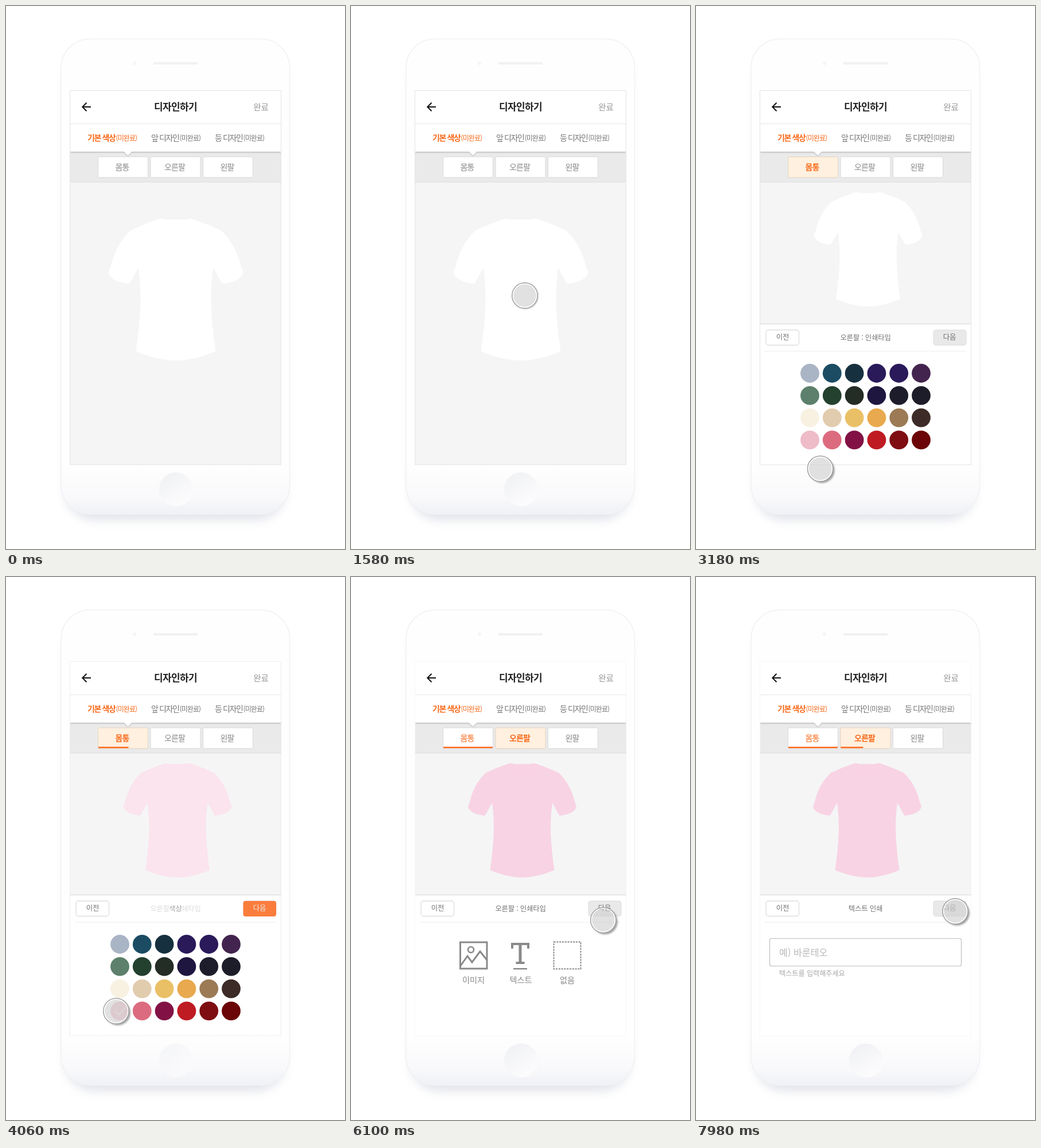
Recreate the animation shown at these times as an HTML page. Size 591x947 px, loop 8000 ms.

```html
<!DOCTYPE html>
<html lang="ko">
<head>
<meta charset="utf-8">
<style>
html, body { margin: 0; width: 100%; height: 100%; overflow: hidden; background: #fff; }
svg { display: block; width: 100%; height: 100%; font-family: "Noto Sans CJK KR", "Noto Sans CJK", "Noto Sans KR", sans-serif; }
text { text-anchor: middle; fill: #888; }
.start { text-anchor: start; }
.title { font-size: 17px; font-weight: 700; letter-spacing: -.6px; fill: #222; }
.main { font-size: 14px; letter-spacing: -1.4px; font-weight: 500; fill: #777; }
.note { font-size: 12px; letter-spacing: -.9px; fill: #777; }
.main.on { font-weight: 700; }
.on { fill: #f96a1b; }
.part { font-size: 14px; letter-spacing: -.8px; }
.bold { font-weight: 700; }
.bar { font-size: 12.4px; letter-spacing: -.2px; font-weight: 500; fill: #707070; }
.choice { font-size: 14.2px; font-weight: 500; }
.shirt path { fill: inherit; stroke: #e1e1e1; stroke-width: 1.1; stroke-linejoin: round; }
.shirt .line { fill: none; }
.icon { fill: none; stroke: #8a8a8a; }
</style>
</head>
<body>
<svg viewBox="0 0 591 947" preserveAspectRatio="none">
  <defs>
    <linearGradient id="body" x1="0" y1="0" x2="0" y2="1">
      <stop offset="0" stop-color="#fefefe"/><stop offset=".9" stop-color="#fefefe"/>
      <stop offset=".965" stop-color="#f9f9fb"/><stop offset="1" stop-color="#f0f1f5"/>
    </linearGradient>
    <linearGradient id="homeFill" x1="0" y1="0" x2=".6" y2="1">
      <stop offset="0" stop-color="#eff0f3"/><stop offset="1" stop-color="#fcfcfd"/>
    </linearGradient>
    <filter id="soft" x="-20%" y="-20%" width="140%" height="140%"><feGaussianBlur stdDeviation="9"/></filter>
    <filter id="blur" x="-30%" y="-30%" width="160%" height="160%"><feGaussianBlur stdDeviation="1.8"/></filter>
    <filter id="drop" x="-5%" y="-20%" width="110%" height="150%">
      <feDropShadow dx="0" dy="1.5" stdDeviation="1.2" flood-color="#000" flood-opacity=".2"/>
    </filter>
    <clipPath id="screen"><rect x="112" y="148" width="367.5" height="652"/></clipPath>
    <mask id="outside" maskUnits="userSpaceOnUse" x="-40" y="-40" width="80" height="80">
      <rect x="-40" y="-40" width="80" height="80" fill="#fff"/><circle r="22" fill="#000"/>
    </mask>
    <g id="half">
      <path d="M217 392C198 410 188 432 182 457L179 464Q181 480 215 484L219 477L231 455C225 430 226 410 217 392Z"/>
      <path class="line" d="M182 457Q192 472 219 477"/>
      <path d="M296 373Q280 374 271 371L264 373Q240 381 217 392C226 410 225 430 231 455C238 500 235 545 227 602Q262 617 296 618"/>
      <path class="line" d="M264 373C263 386 277 397 296 397M267 372C269 384 281 391 296 391M271 371C275 382 284 388 296 388"/>
    </g>
  </defs>

  <rect x="104" y="80" width="382" height="816" rx="50" fill="#687090" opacity=".2" filter="url(#soft)"/>
  <rect x="96" y="57.5" width="398.5" height="829" rx="50" fill="url(#body)" stroke="#f0f1f4" stroke-width="1.5"/>
  <circle cx="224" cy="100" r="3" fill="#f5f5f7"/>
  <path d="M259 100H332" stroke="#f1f1f4" stroke-width="4.5" stroke-linecap="round"/>
  <circle id="home" cx="296.5" cy="843" r="29.5" fill="url(#homeFill)"/>

  <g clip-path="url(#screen)">
    <rect x="112" y="148" width="368" height="652" fill="#f5f5f5"/>
    <g id="shirt" class="shirt">
      <path d="M296 380V617" style="stroke:inherit;stroke-width:6"/>
      <use href="#half"/><use href="#half" transform="translate(592) scale(-1 1)"/>
    </g>
    <rect x="112" y="250" width="368" height="57" fill="#eaeaea"/>
    <path d="M112 307H480" stroke="#dcdcdc"/>
    <path d="M112 205H479.5V254H219L212.500 260.500L206 254H112Z" fill="#fff" filter="url(#drop)"/>
    <rect x="112" y="148" width="368" height="57" fill="#fff"/>
    <path d="M112 205.500H480" stroke="#e6e6e6"/>
    <g id="parts"></g>

    <g id="panel">
      <rect x="112" y="555" width="368" height="245" fill="#fff"/>
      <path d="M112 554.500H480" stroke="#d6d6d6"/>
      <path d="M120 602H470" stroke="#ebebeb"/>
      <rect x="122" y="565" width="57.5" height="26.500" rx="4" fill="#fff" stroke="#dedede" stroke-width="1.3"/>
      <text class="bar bold" x="151" y="582">이전</text>
      <rect x="414" y="565" width="57" height="26.500" rx="4" fill="#e9e9e9" stroke="#dcdcdc"/>
      <text class="bar" x="442" y="582">다음</text>
      <g id="next"><rect x="413.500" y="565" width="57.500" height="27" rx="4" fill="#ff6a1f"/>
        <text class="bar" x="442" y="582" style="fill:#fff">다음</text></g>
      <g id="labels"></g>
      <g id="swatches"></g>
      <path id="check" d="M190.500 757L197 763.500L208 751" fill="none" stroke="#fff" stroke-width="2.2"/>
      <g id="choices">
        <g class="icon" stroke-width="3">
          <rect x="190.500" y="637" width="46.500" height="46"/>
          <circle cx="209" cy="650" r="5" stroke-width="2.600"/>
          <path d="M191 678L203 661L211 672L225 653L237 668"/>
          <rect x="353.500" y="636.500" width="47" height="47" stroke-width="2" stroke-dasharray="3.200 1.600"/>
        </g>
        <text class="choice" x="213.500" y="708">이미지</text>
        <text class="choice" x="377" y="708">없음</text>
        <g id="textChoice">
          <path d="M279 638h32v10h-4v-6h-9.500v29h5v4h-15v-4h5v-29h-9.500v6h-4zM283 682h24v2.500h-24z"/>
          <text class="choice" x="296" y="708" style="fill:inherit">텍스트</text>
        </g>
      </g>
      <g id="form">
        <rect x="128.500" y="630.500" width="334" height="48" rx="3" fill="#fff" stroke="#bdbdbd" stroke-width="1.2"/>
        <text class="start" x="145" y="661" font-size="16.200" style="fill:#b9b9b9">예) 바룬테오</text>
        <text class="start" x="145" y="696" font-size="12.100" style="fill:#a6a6a6">텍스트를 입력해주세요</text>
      </g>
    </g>
  </g>
  <rect id="frame" x="111.500" y="147.500" width="368" height="652.500" fill="none" stroke="#e4e4e4"/>

  <path d="M148 176H133.500M140.500 168.800L133.300 176L140.500 183.200" fill="none" stroke="#111" stroke-width="2"/>
  <text class="title" x="295.500" y="182">디자인하기</text>
  <text x="444.500" y="181.500" font-size="14.500" style="fill:#999">완료</text>
  <g id="tabs"></g>

  <g id="cursor">
    <g mask="url(#outside)"><circle id="shade" r="22" fill="#000" opacity=".36" filter="url(#blur)"/></g>
    <circle r="20" fill="#d2d2d2" opacity=".66"/>
    <circle r="20.800" fill="none" stroke="#fff" stroke-width="1.800"/>
    <circle r="22.200" fill="none" stroke="#a0a0a0" stroke-width="1.500"/>
  </g>
</svg>
<script>
const LOOP = 8000;
const $ = id => document.getElementById(id);
const fade = (el, v) => el.setAttribute('opacity', v);
const move = (el, x, y) => el.setAttribute('transform', `translate(${x} ${y})`);
const mix = (a, b, p) => a + (b - a) * p;
const mixRgb = (a, b, p) => `rgb(${a.map((v, i) => mix(v, b[i], p)).join()})`;
const ease = (t, from, to) => 1 - (1 - Math.min(1, Math.max(0, (t - from) / (to - from)))) ** 2.3;

const GREY = [138, 138, 138], ORANGE = [255, 106, 31];
const WHITE = [255, 255, 255], PINK = [248, 211, 227];

$('tabs').innerHTML = ['기본 색상', '앞 디자인', '등 디자인'].map((name, i) => {
  const x = 142 + 111 * i, on = i ? '' : ' on';
  return `<text class="start main${on}" x="${x}" y="235">${name}</text>
    <text class="start note${on}" x="${x + 49.5}" y="235">(미완료)</text>`;
}).join('');

const partX = [160.5, 252, 343.5];
$('parts').innerHTML = ['몸통', '오른팔', '왼팔'].map((name, i) => {
  const x = partX[i], label = cls => `<text class="part ${cls}" x="${x + 42}" y="286">${name}</text>`;
  return `<rect x="${x}" y="263" width="87" height="36" rx="1.5" fill="#fff" stroke="#d8d8d8"/>
    <g class="idle">${label('')}</g><g class="done">${label('on')}</g>
    <g class="active"><rect x="${x}" y="263" width="87" height="36" rx="1.5" fill="#fff0df" stroke="#e6d6c4"/>${label('on bold')}</g>
    <rect class="meter" x="${x + .5}" y="296" height="2.5" fill="#ff6a1f"/>`;
}).join('');
const layer = name => [...$('parts').querySelectorAll('.' + name)];
const idle = layer('idle'), done = layer('done'), active = layer('active'), meter = layer('meter');

$('labels').innerHTML = ['오른팔 : 인쇄타입', '색상', '오른팔 : 인쇄타입', '텍스트 인쇄'].map((name, i) =>
  `<g>${i === 1 ? '<rect x="284" y="570" width="23" height="18" fill="#fff"/>' : ''}
    <text class="bar" x="295.5" y="583">${name}</text></g>`).join('');
const labels = [...$('labels').children];

$('swatches').innerHTML = [
  'a9b4c4 1b4c63 17303f 2a1a5a 2a1a5a 43244f',
  '5c806b 24402f 232c25 1f1640 1c1c2b 1d1c29',
  'f8f1e2 e1ccae eac066 e9a94e 9b7a55 3c2b27',
  'eebbc8 dc6b7f 821245 bf1b23 7e0e12 6b0507'
].map((row, j) => row.split(' ').map((color, i) =>
  `<circle cx="${198.5 + 38.8 * i}" cy="${640.5 + 38.8 * j}" r="16.4" fill="#${color}"/>`).join('')).join('');

// Each trip: start time, end time, then start, control and end points.
const trips = [
  [360, 990, [489, -32], [340, 575], [303, 505]],
  [2900, 3570, [303, 505], [230, 930], [192, 757]],
  [4740, 5410, [192, 757], [542, 677], [452, 583]],
  [6080, 6570, [452, 583], [390, 666], [297, 690]],
  [6990, 7470, [297, 690], [420, 680], [452, 583]]
];
const presses = [[1580, 1840], [3720, 3960], [5560, 5640], [6700, 6760], [7540, 7600]];

function cursorAt(t) {
  const [from, to, a, c, b] = trips.filter(trip => t >= trip[0]).pop() || trips[0];
  const u = ease(t, from, to), v = 1 - u;
  return [0, 1].map(k => v * v * a[k] + 2 * u * v * c[k] + u * u * b[k]);
}

function setPart(i, on, finished, length) {
  fade(active[i], on * (1 - finished));
  fade(done[i], finished);
  fade(idle[i], 1 - Math.max(on, finished));
  meter[i].setAttribute('width', 86 * length);
}

function draw(t) {
  const open = ease(t, 1820, 2200);
  const colour = ease(t, 3940, 4300);
  const print = ease(t, 5600, 5740);
  const picked = ease(t, 6740, 6900);
  const form = ease(t, 7720, 7960);

  const scale = mix(1, .805, open);
  $('shirt').setAttribute('transform',
    `translate(${mix(296, 300, open) - 1.5 * colour} ${mix(371, 325, open)}) scale(${scale}) translate(-296 -371)`);
  const cloth = mixRgb(WHITE, PINK, colour);
  $('shirt').style.fill = $('shirt').style.stroke = cloth;

  move($('panel'), 0, 246 * (1 - open));
  fade($('home'), 1 - open + colour);
  fade($('frame'), 1 - .7 * colour);

  setPart(0, open, print, colour);
  setPart(1, print, 0, .22 * picked + .23 * form);
  setPart(2, 0, 0, 0);

  const ready = colour * (1 - print) + picked * (1 - form);
  fade($('next'), 1 - (1 - ready) ** 2);
  [(1 - colour) ** 1.5, colour * (1 - print), print * (1 - form), form].forEach((v, i) => fade(labels[i], v));

  fade($('swatches'), 1 - print);
  fade($('check'), colour * (1 - print));
  fade($('choices'), print * (1 - form));
  $('textChoice').style.fill = mixRgb(GREY, ORANGE, picked);
  fade($('form'), form);

  move($('cursor'), ...cursorAt(t));
  const lift = presses.some(([from, to]) => t >= from && t < to) ? 1 : 3;
  move($('shade'), lift, lift);
}

const began = performance.now();
function tick() {
  draw((performance.now() - began) % LOOP);
  requestAnimationFrame(tick);
}
tick();
</script>
</body>
</html>
```
